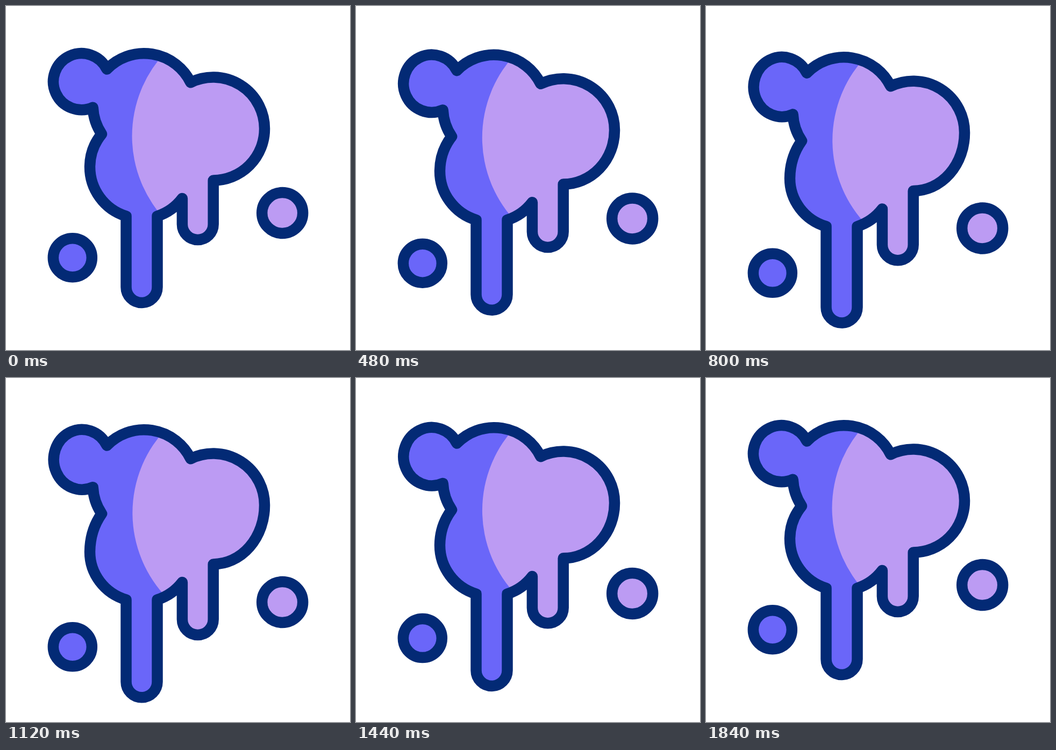
Recreate the animation shown at these times as an HTML page. Size 640x640 px, loop 2040 ms.

```html
<!DOCTYPE html>
<html lang="en">
<head>
<meta charset="utf-8">
<title>Dripping paint</title>
<style>
  html, body { margin: 0; width: 100%; height: 100%; overflow: hidden; background: #fff; }
  svg { display: block; width: 100%; height: 100%; }
  .line { stroke: #032a75; stroke-width: 20.5; stroke-linejoin: round; }
  .deep { fill: #6a66f9; }
  .pale { fill: #bc9bf3; }
</style>
</head>
<body>
<svg viewBox="0 0 640 640">
  <defs>
    <clipPath id="inside"><path class="blob"/></clipPath>
  </defs>
  <path class="blob deep"/>
  <g clip-path="url(#inside)">
    <path id="shade" class="pale" d="M300.5 82A227 227 0 0 0 300.5 402V640H600V82z"/>
  </g>
  <path class="blob line" fill="none"/>
  <g id="dots" class="line">
    <circle class="deep" cx="123.8" cy="468.2" r="36"/>
    <circle class="pale" cx="514.2" cy="385" r="38"/>
  </g>
</svg>
<script>
const FRAME = 40, LOOP = 2040, LOW = 1120, END = 1840;
const blobs = document.querySelectorAll('.blob');
const shade = document.getElementById('shade');
const dots = document.getElementById('dots');

// Cubic easing curve with handles (x1, 0) and (x2, 1).
function ease(x, x1, x2) {
  let lo = 0, hi = 1;
  for (let i = 0; i < 30; i++) {
    const s = (lo + hi) / 2, r = 1 - s;
    if (3 * x1 * s * r * r + 3 * x2 * s * s * r + s * s * s < x) lo = s; else hi = s;
  }
  return lo * lo * (3 - 2 * lo);
}

// Sag of the paint: 0 at rest, 1 at its lowest.
function sagAt(t) {
  if (t < LOW) return ease(t / LOW, 0.61, 0.39);
  if (t < END) return 1 - ease((t - LOW) / (END - LOW), 0.65, 0.2);
  return 0;
}

function outline(p) {
  const at = (y, drop) => y + drop * p;
  const arc = (rx, ry, x, y, large = 0) => `A${rx} ${ry} 0 ${large} 1 ${x} ${y}`;
  return `M187.6 ${at(117.5, 8)}`
    + arc(96.5, 96.5, 343.5, at(142.2, 8))
    + arc(95.6, 95.6, 481, at(228.6, 8.3))
    + arc(95.4, at(95.8, 13.5), 385.7, at(324.4, 22))
    + `V${at(406, 43)}` + arc(28.9, 28.9, 327.9, at(406, 43))
    + `V${at(358, 22)}`
    + arc(96, 96, 281.5, at(391, 21.5))
    + `V${at(523, 42.2)}` + arc(29, 29, 223.5, at(523, 42.2))
    + `V${at(391, 21.5)}`
    + arc(96, at(96, -3), 156, at(298, 25))
    + arc(96, at(96, 17), 178, at(238.2, 14.2))
    + arc(96, 96, 161.7, at(188.7, 14.5))
    + arc(52.5, at(52.5, 3.4), 187.6, at(117.5, 8), 1) + 'z';
}

function draw() {
  const t = Math.floor(performance.now() % LOOP / FRAME) * FRAME;
  const p = sagAt(t), d = outline(p);
  blobs.forEach(b => b.setAttribute('d', d));
  shade.setAttribute('transform', `translate(${0.8 * p} ${9 * p})`);
  dots.setAttribute('transform', `translate(0 ${32 * p})`);
  requestAnimationFrame(draw);
}
draw();
</script>
</body>
</html>
```
